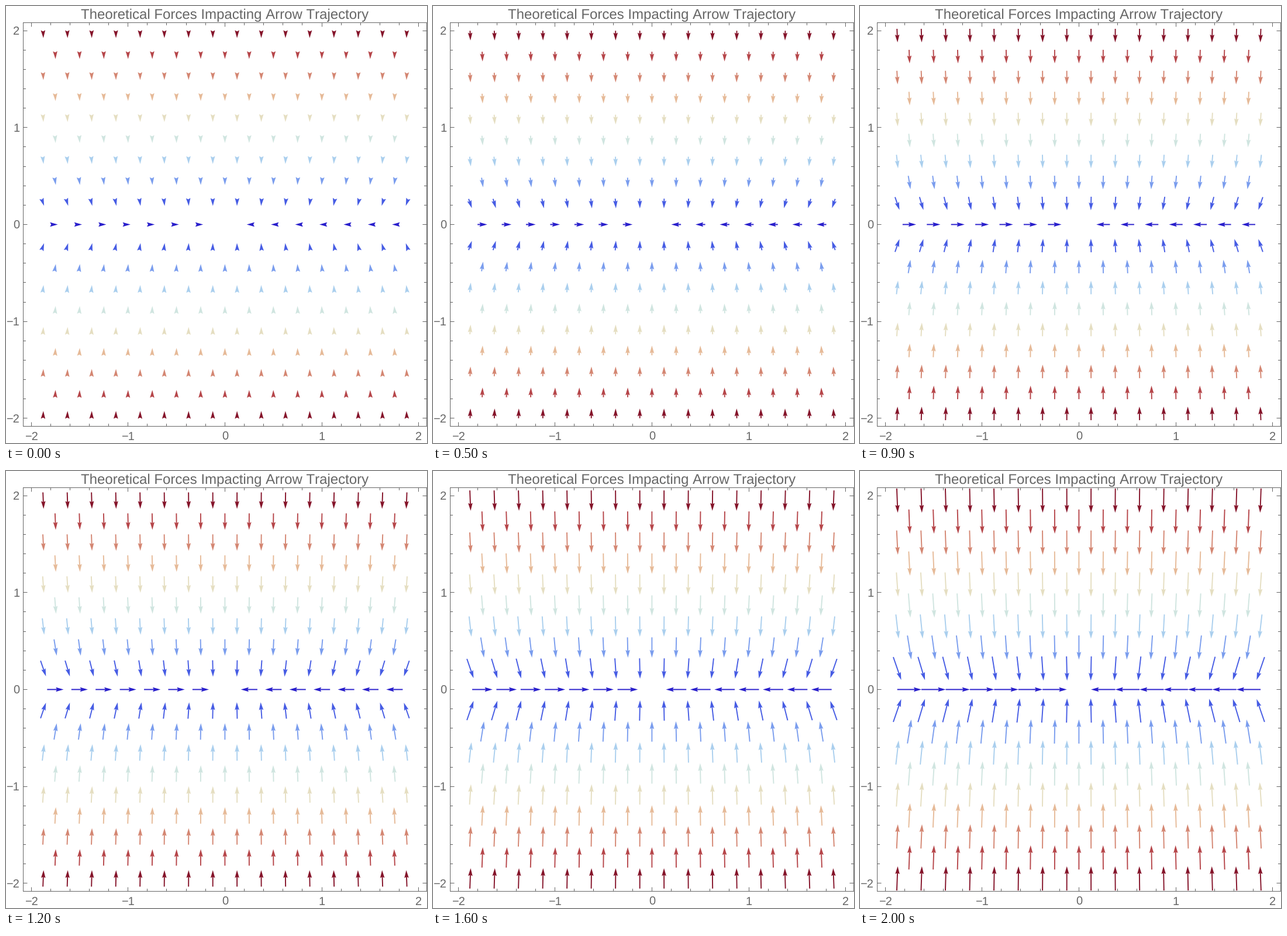
Animation, 720 px wide and 747 px high, one loop 2100 ms. Source, as a matplotlib script:

```python
import numpy as np
import matplotlib.pyplot as plt
from matplotlib.animation import FuncAnimation
from matplotlib.collections import LineCollection, PolyCollection

plt.rcParams["font.family"] = "Liberation Sans"
plt.rcParams["text.hinting"] = "none"
plt.rcParams["text.kerning_factor"] = 6     # plain advance widths

W, H = 720, 747
FRAMES, INTERVAL = 21, 100
CX, CY, UNIT = 374.4, 373.5, 165.7      # plot centre and pixels per unit
LEFT, RIGHT, TOP, BOTTOM = 29.5, 719.5, 28.5, 718.5
GREY = "#666666"
STEP = 0.25                             # spacing of the hexagonal lattice
HEAD, NOTCH, HALF = 13.3, 11.3, 3.8     # arrowhead size in pixels

ROW_COLORS = np.array([
    (42, 32, 204), (70, 92, 228), (122, 157, 238), (170, 207, 238),
    (208, 229, 224), (229, 222, 193), (230, 186, 152), (212, 134, 114),
    (182, 70, 74), (133, 20, 42)]) / 255

# dpi 72 makes one point equal one pixel
fig = plt.figure(figsize=(W / 72, H / 72), dpi=72, facecolor="white")
ax = fig.add_axes([0, 0, 1, 1])
ax.set_xlim(0, W)
ax.set_ylim(H, 0)
ax.axis("off")


def line(x0, y0, x1, y1):
    ax.plot([x0, x1], [y0, y1], color=GREY, lw=1, snap=False,
            solid_capstyle="butt", zorder=1)


def label(x, y, text, size, ha):
    ax.text(x, y, text, color=GREY, fontsize=size, ha=ha, va="baseline")


def pixel_center(v):
    return np.floor(v) + 0.5


def draw_frame():
    for y in (TOP, BOTTOM):
        line(LEFT - 0.5, y, RIGHT + 0.5, y)
    for x in (LEFT, RIGHT):
        line(x, TOP, x, BOTTOM)
    for i in range(-10, 11):
        major = i % 5 == 0
        size = 7 if major else 4.5
        cx, cy = CX + i / 5 * UNIT, CY + i / 5 * UNIT
        x, y = pixel_center(cx), pixel_center(cy)
        line(x, TOP, x, TOP + size)
        line(x, BOTTOM, x, BOTTOM - size)
        line(LEFT, y, LEFT + size, y)
        line(RIGHT, y, RIGHT - size, y)
        if major:
            n = i // 5
            label(cx, 742, str(n).replace("-", "\u2212"), 20, "center")
            label(23.3, cy + 7, str(-n).replace("-", "\u2212"), 20, "right")
    label(CX, 22, "Theoretical Forces Impacting Arrow Trajectory", 24, "center")


def lattice():
    points, colors = [], []
    for j in range(-9, 10):
        count = 16 if j % 2 else 15
        for i in range(count):
            x = (i - (count - 1) / 2) * STEP
            if j or x:
                points.append((x, j * STEP * np.sqrt(3) / 2))
                colors.append(ROW_COLORS[abs(j)])
    return np.array(points), np.array(colors)


draw_frame()
points, colors = lattice()

# Linear force pulling 25 times harder along y, drawn with unit length
force = points * (-1, -25)
force /= np.linalg.norm(force, axis=1, keepdims=True)
along = force * (1, -1)
across = along[:, ::-1] * (-1, 1)
centers = np.array([CX, CY]) + points * (UNIT, -UNIT)

shafts = LineCollection([], colors=colors, linewidths=1.9,
                        capstyle="butt", snap=False, zorder=3)
heads = PolyCollection([], facecolors=colors, edgecolors="none",
                       snap=False, zorder=4)
ax.add_collection(shafts, autolim=False)
ax.add_collection(heads, autolim=False)


def update(k):
    length = (0.05 + 0.01 * k) * UNIT
    tip = centers + along * length / 2
    tail = centers - along * length / 2
    notch = tip - along * NOTCH
    back = tip - along * HEAD
    corners = [tip, back + across * HALF, notch, back - across * HALF]
    heads.set_verts(np.stack(corners, axis=1))
    end = notch + along if length > NOTCH else tail
    shafts.set_segments(np.stack([tail, end], axis=1))
    return shafts, heads


anim = FuncAnimation(fig, update, frames=FRAMES, interval=INTERVAL,
                     repeat=True, repeat_delay=0, blit=False)
plt.show()
```
